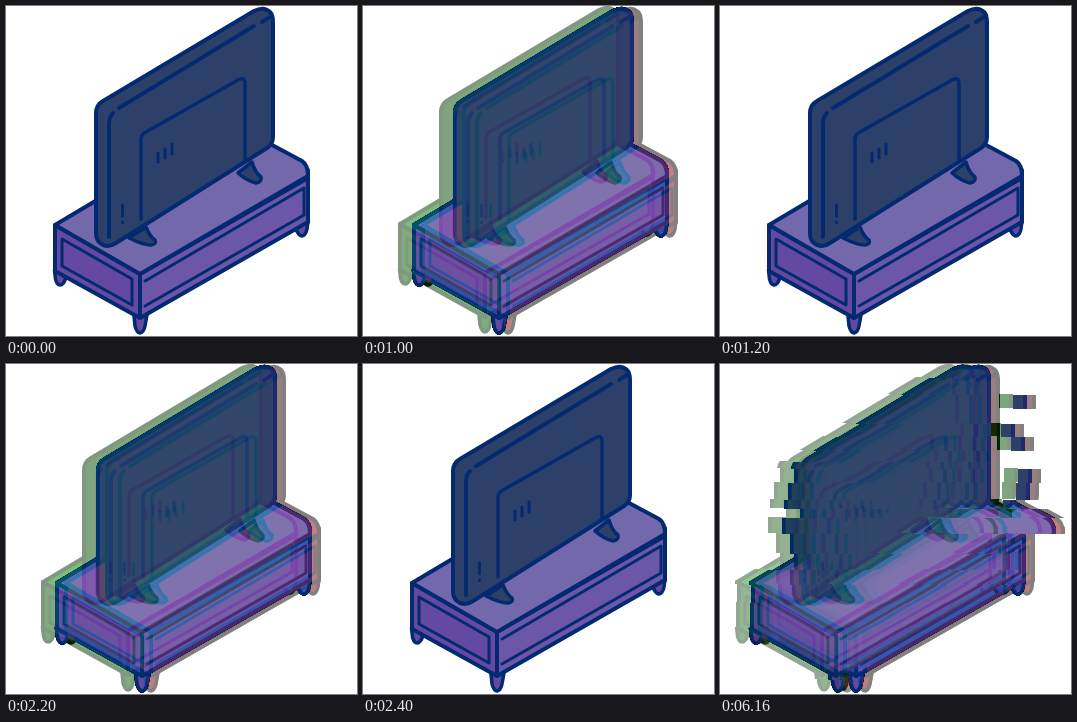
These frames come from a looping animation (351 by 330 pixels, 8000 ms). An HTML page:

```html
<!DOCTYPE html>
<html lang="en">
<head>
<meta charset="utf-8">
<title>Television glitch</title>
<style>
  html, body { margin: 0; width: 100%; height: 100%; overflow: hidden; background: #fff; }
  svg { display: block; width: 100%; height: 100%; }
</style>
</head>
<body>
<svg viewBox="0 0 351 330">
  <defs>
    <!-- The green and red channels are each mixed with a shifted, half transparent copy. -->
    <filter id="split" filterUnits="userSpaceOnUse" x="0" y="0" width="351" height="330" color-interpolation-filters="sRGB">
      <feOffset in="SourceGraphic" dx="2" result="middle"/>
      <feColorMatrix in="middle" result="red" values="1 0 0 0 0  0 0 0 0 0  0 0 0 0 0  0 0 0 1 0"/>
      <feColorMatrix in="middle" result="green" values="0 0 0 0 0  0 1 0 0 0  0 0 0 0 0  0 0 0 1 0"/>
      <feColorMatrix in="middle" result="blue" values="0 0 0 0 0  0 0 0 0 0  0 0 1 0 0  0 0 0 1 0"/>
      <feOffset in="SourceGraphic" dx="-12" dy="-1"/>
      <feColorMatrix result="leftGhost" values="0 0 0 0 0  0 1.2 0 0 0  0 0 0 0 0  0 0 0 .5 0"/>
      <feOffset in="SourceGraphic" dx="11"/>
      <feColorMatrix result="rightGhost" values="1.2 0 0 0 0  0 0 0 0 0  0 0 0 0 0  0 0 0 .5 0"/>
      <feComposite in="leftGhost" in2="green" result="greenMix"/>
      <feComposite in="rightGhost" in2="red" result="redMix"/>
      <feComposite in="greenMix" in2="redMix" operator="arithmetic" k2="1" k3="1"/>
      <feComposite in2="blue" operator="arithmetic" k2="1" k3="1"/>
    </filter>

    <g id="art" stroke="#032a70" stroke-width="4" stroke-linejoin="round" stroke-linecap="round">
      <g id="legs" fill="#6349a0" stroke-width="3.5">
        <path d="M48.500 264L49.500 273Q51 279 54 279Q58 279 60 271Z"/>
        <path d="M128 310L129 320Q131 327 134 327Q138 326 139 320L141 309Z"/>
        <path d="M289 222L292 227Q294 230 296 230Q300 229 301 223L302 215Z"/>
      </g>
      <g id="cabinet">
        <path fill="#6349a0" d="M49 219L134 268V312L49 265Z"/>
        <path fill="#6c56a8" d="M134 268L302 172V216L134 312Z"/>
        <path fill="#7468ad" d="M49 219L180 141Q228 116 268 140L296 155Q302 159 302 170L134 268Z"/>
        <path fill="none" d="M302 164V216"/>
        <g fill="none" stroke-width="3">
          <path d="M56 233L126 273V299L56 260Z"/>
          <path d="M139 275L298 182V209L139 300"/>
        </g>
      </g>
      <g id="feet" fill="#2d4069" stroke-width="3.5">
        <path d="M123 232L140 221Q144 231 149 234Q151 238 145 239Q137 239 123 232Z"/>
        <path d="M232 167L246 156Q249 167 255 171Q256 176 250 177Q241 175 232 167Z"/>
      </g>
      <g id="screen">
        <path fill="#2d4069" d="M90 107Q90 99 97 95L248 5Q258 0 264 6Q267 9 267 16V131Q267 138 261 142L110 237Q101 243 94 237Q90 234 90 227Z"/>
        <path fill="none" d="M103 231V118Q103 111 107 107M113 102L248 20M256 16L264 11"/>
        <path fill="none" stroke-width="3.500" d="M135 213V134Q135 128 140 126L232 74Q239 70 239 78V153"/>
        <path fill="none" stroke-width="3" d="M152 147V156M159 143V152M166 138V148M116.500 199V210M116.500 216V216.500"/>
      </g>
    </g>
  </defs>
  <rect width="351" height="330" fill="#fff"/>
  <use id="clean" href="#art"/>
  <use id="ghost" href="#art" filter="url(#split)"/>
  <g id="glitch" filter="url(#split)"></g>
</svg>
<script>
  const LOOP = 8000, WIDTH = 351, HEIGHT = 330;
  const $ = id => document.getElementById(id);

  let seed = 7;
  function random(min, max) {
    seed = (seed * 16807) % 2147483647;
    return min + (max - min) * seed / 2147483647;
  }

  function node(tag, attrs, parent) {
    const el = document.createElementNS("http://www.w3.org/2000/svg", tag);
    for (const key in attrs) el.setAttribute(key, attrs[key]);
    return parent.appendChild(el);
  }

  let clipCount = 0;
  function piece(x, y, width, height, shift, opacity = 1) {
    const id = "clip" + clipCount++;
    const clip = node("clipPath", { id }, document.querySelector("defs"));
    node("rect", { x, y, width, height }, clip);
    const group = node("g", { transform: `translate(${shift})`, opacity }, $("glitch"));
    node("use", { href: "#art", "clip-path": `url(#${id})` }, group);
  }

  // Two torn copies: one stays, one jumps left. Beside the screen, edge blocks fly off.
  function buildGlitch() {
    let y = 0;
    while (y < HEIGHT) {
      const besideScreen = y > 25 && y < 160;
      const height = Math.round(besideScreen ? random(5, 18) : random(14, 26));
      const jitter = besideScreen ? 10 : 4;
      piece(0, y, WIDTH, height, 0);
      piece(0, y, WIDTH, height, Math.round(random(-19 - jitter, -19 + jitter)), 0.85);
      if (besideScreen && random(0, 1) < 0.6)
        piece(255, y, WIDTH, height, Math.round(random(12, 44)));
      y += height;
    }
  }

  function stateAt(t) {
    if (t >= 3400) return "glitch";
    return t % 1200 < 1000 ? "clean" : "ghost";
  }

  function draw(t) {
    const state = stateAt(t);
    for (const id of ["clean", "ghost", "glitch"])
      $(id).style.display = id === state ? "" : "none";
  }

  buildGlitch();
  const start = performance.now();
  function tick() {
    draw((performance.now() - start) % LOOP);
    requestAnimationFrame(tick);
  }
  tick();
</script>
</body>
</html>
```
